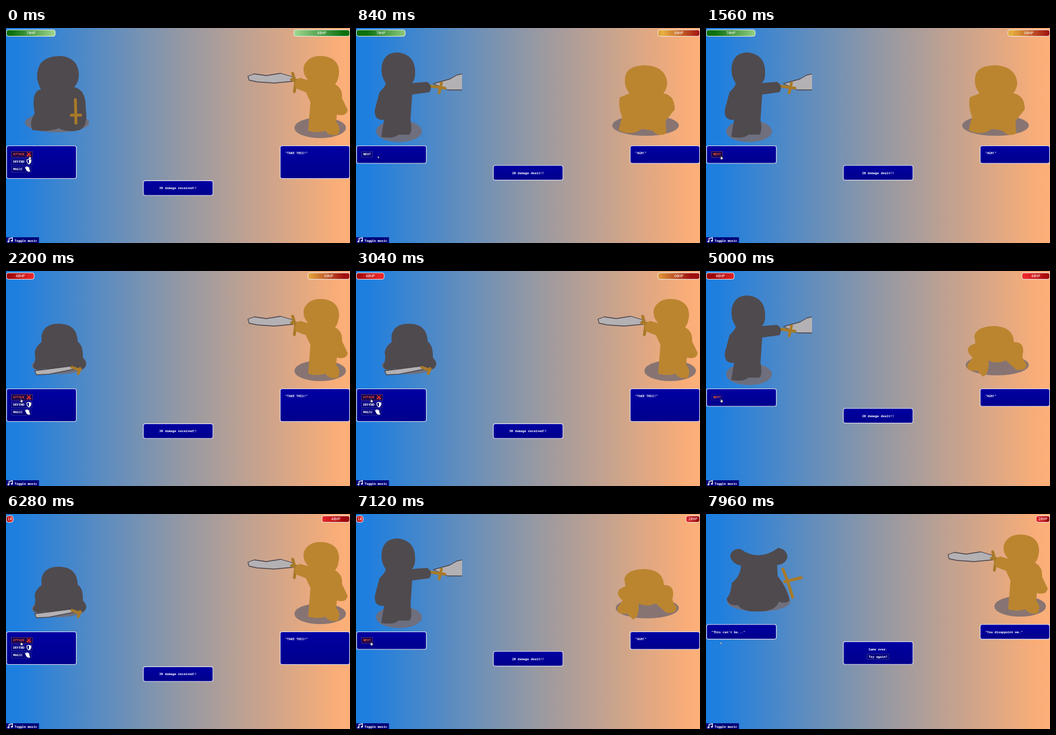
Recreate the animation shown at these times as an HTML page. Size 600x375 px, loop 8000 ms.

```html
<!DOCTYPE html>
<html lang="en">
<head>
<meta charset="utf-8">
<title>Duel</title>
<style>
  html, body { margin: 0; width: 100%; height: 100%; overflow: hidden; background: #888; }
  svg { display: block; width: 100vw; height: 100vh; }
  text { font: bold 5.45px "Noto Sans Mono", "DejaVu Sans Mono", monospace; fill: #fff; white-space: pre; }
  .hp text { font-size: 6.7px; font-weight: 500; text-anchor: middle; }
  .mid { text-anchor: middle; }
  .panel { fill: url(#navy); stroke: #e2e2f0; stroke-width: 1.15; }
  .btn rect { fill: #00007c; stroke: #4c4c92; stroke-width: .6; }
  .hot rect { fill: #14004c; stroke: #8c5058; }
  .hot text { fill: #ff5a30; }
  .down rect { fill: #00008e; stroke: #6a4a78; stroke-dasharray: 1 1; }
  .shadow { fill: #776c70; opacity: .85; }
  .left { fill: #4f4a4e; }
  .right { fill: #bb8530; }
  .blade { fill: #b4b1b4; stroke: #4a444a; stroke-width: 1.3; stroke-linejoin: round; }
  .hilt { fill: none; stroke: #a87a28; stroke-width: 5; stroke-linecap: round; stroke-linejoin: round; }
</style>
</head>
<body>
<svg viewBox="0 0 600 375" preserveAspectRatio="none">
  <defs>
    <linearGradient id="sky">
      <stop offset="0" stop-color="#1b7fe0"/>
      <stop offset=".04" stop-color="#207fde"/>
      <stop offset=".5" stop-color="#9298a5"/>
      <stop offset=".96" stop-color="#f9ad78"/>
      <stop offset="1" stop-color="#fdb079"/>
    </linearGradient>
    <linearGradient id="navy" x2="0" y2="1">
      <stop offset="0" stop-color="#0000a2"/>
      <stop offset="1" stop-color="#00008c"/>
    </linearGradient>
    <clipPath id="tip"><rect y="30" width="185" height="180"/></clipPath>
  </defs>
  <rect width="600" height="375" fill="url(#sky)"/>
  <g id="scene"></g>
  <g id="bars" class="hp"></g>
  <g id="music">
    <rect y="365" width="57.5" height="10" fill="#000078"/>
    <path d="M5.2 372.3V367l6-1.2v5.3" fill="none" stroke="#fff" stroke-width="1.3"/>
    <ellipse cx="4.2" cy="372.4" rx="1.7" ry="1.3" fill="#fff"/>
    <ellipse cx="10.2" cy="371.2" rx="1.7" ry="1.3" fill="#fff"/>
    <text x="15" y="372.6">Toggle music</text>
  </g>
  <g id="cursor">
    <path id="arrow" d="M0 .4v3.6l.9-.8.7 1.5.7-.4-.7-1.4h1.2z" fill="#fff" stroke="#223" stroke-width=".3"/>
    <path id="hand" d="M.8 0h1v2l2.4.6v2.2l-.8 1.5H1.1L-.4 4l.6-.6.6.5z" fill="#fff" stroke="#111" stroke-width=".5"/>
  </g>
</svg>
<script>
const LOOP = 8000;
const $ = id => document.getElementById(id);

// Start time, phase and both hit point totals.
const turns = [
  { at: 0, phase: "enemy", hp: [70, 80], pose: "kneel" },
  { at: 440, phase: "player", hp: [70, 60], pose: "kneel" },
  { at: 1720, phase: "enemy", hp: [40, 60], pose: "low" },
  { at: 3440, phase: "player", hp: [40, 40], pose: "low" },
  { at: 6000, phase: "enemy", hp: [10, 40], pose: "low" },
  { at: 6640, phase: "player", hp: [10, 20], pose: "low" },
  { at: 7300, phase: "over", hp: [0, 20], pose: "fallen" }
];

const shadow = (x, y, rx, ry) => `<ellipse class="shadow" cx="${x}" cy="${y}" rx="${rx}" ry="${ry}"/>`;
const body = (side, d) => `<path class="${side}" d="${d}"/>`;
const blade = d => `<path class="blade" d="${d}"/>`;
const hilt = d => `<path class="hilt" d="${d}"/>`;

const poses = {
  left: {
    kneel: shadow(89, 165, 56, 17) +
      body("left", "M60 62Q72 48 97 49Q124 52 127 78Q128 94 119 103Q140 108 139 140Q144 172 128 178Q108 183 92 175Q72 182 46 178Q40 164 50 149Q43 110 61 107Q48 84 60 62Z") +
      hilt("M121 125L122 166M114 152h16"),
    low: shadow(92, 165, 47, 15) +
      body("left", "M62 112Q67 91 94 92Q124 93 125 123Q135 130 134 151Q146 163 134 171L113 167Q92 174 69 170Q47 176 47 164Q53 158 50 141Q53 130 62 124Z") +
      blade("M50 174L112 166L120 171L75 180L53 181Z") +
      hilt("M115 168l14 5M126 179l3-9"),
    attack: shadow(75, 180, 40, 19) +
      `<g clip-path="url(#tip)">${blade("M135 97L164 89L176 82L190 79V108H160Z")}</g>` +
      hilt("M107 98l48 7M149 96l-4 17") +
      body("left", "M45 65Q50 41 76 43Q102 48 103 74Q104 91 97 96L124 94Q135 101 128 112L98 116L95 160Q99 180 93 186H74Q66 194 44 190L49 160Q31 162 33 142L41 112Q51 102 52 97Q42 82 45 65Z"),
    fallen: shadow(92, 153, 55, 17) +
      hilt("M134 96l8 20l9 29M137 118l29-7") +
      body("left", "M42 74Q44 60 60 61Q92 84 126 59Q142 62 142 76Q138 88 124 89L125 108Q143 132 146 151Q139 157 127 153Q122 170 91 170Q63 171 56 159Q38 161 36 147Q43 141 45 120Q60 109 61 90Q46 87 42 74Z")
  },
  right: {
    attack: shadow(548, 174, 45, 18) +
      blade("M422 84L433 80L454 83L479 79L500 85L500 93L468 96L438 94L424 91Z") +
      hilt("M500 79l5 17l-2 15M498 90l16 2") +
      body("right", "M520 65Q529 47 553 49Q580 52 581 76Q580 92 574 98Q588 106 586 122L596 143Q594 155 577 151L576 164Q585 174 579 186Q565 190 557 179Q543 184 527 179L531 129L523 112L505 105Q501 91 513 87L527 91Q516 79 520 65Z"),
    kneel: shadow(505, 170, 58, 18) +
      body("right", "M470 83Q474 65 506 65Q540 67 543 96Q542 107 536 114Q556 117 556 142L540 162L541 184Q528 191 517 179L499 176L488 182Q471 186 458 178L464 155Q457 138 460 121L477 114Q466 101 470 83Z"),
    low: shadow(508, 164, 55, 18) +
      body("right", "M468 113Q473 96 504 96Q536 98 537 124Q555 123 553 143Q549 151 559 162Q559 175 541 172L523 156Q507 163 493 156Q494 181 483 184L473 174Q453 176 456 163L465 151Q451 139 461 130L470 126Z")
  }
};

const label = (x, y, s, cls = "") => `<text x="${x}" y="${y + 2}" class="${cls}">${s}</text>`;
const panel = (x, y, w, h) => `<rect class="panel" x="${x}" y="${y}" width="${w}" height="${h}" rx="3.5"/>`;
const button = (x, y, w, s, cls = "", icon = "") =>
  `<g class="btn ${cls}"><rect x="${x}" y="${y - 4.8}" width="${w}" height="9.8"/>${label(x + 3, y, s)}${icon}</g>`;

const icons = {
  swords: '<path d="M36.8 217l6 6M42.8 217l-6 6M36 221.3l2.7 2.5M43.6 221.3l-2.7 2.5" stroke="#f2382c" stroke-width="1.6"/>',
  shield: '<path d="M40 229l3.6 1.2q.2 5-3.6 7q-3.8-2-3.6-7z" fill="#00007c" stroke="#fff" stroke-width="1.2"/><path d="M40 229l3.6 1.2q.2 5-3.6 7z" fill="#fff"/>',
  palm: '<path d="M33 243l1.2-.7 1 1 .6-2 1.2.1.6 1.1 1-.6.8 1 1 .2.7 4.2 1.2 2.8-3.1.7-3.2-1.8z" fill="#fff"/>'
};

function panels(phase, hover, pressed) {
  if (phase === "over") {
    return panel(1, 192.7, 121.7, 25.6) + panel(478.2, 192.7, 121.2, 25.6) + panel(239.5, 222.6, 121.5, 39.6) +
      label(9.5, 206, '"This can\'t be..."') + label(487, 206, '"You disappoint me."') +
      label(300, 235.7, "Game over.", "mid") +
      '<g class="btn"><rect x="281" y="244" width="38" height="9.6"/></g>' + label(300, 248.8, "Try again?", "mid");
  }
  const enemy = phase === "enemy";
  const h = enemy ? 57 : 30.5;
  const hot = hover ? "hot" : "";
  const buttons = enemy
    ? button(9.6, 220.2, 36.5, "ATTACK", hot, icons.swords) +
      button(9.6, 233.2, 36, "DEFEND", "", icons.shield) +
      button(9.6, 246.2, 34, "MAGIC", "", icons.palm)
    : button(9.8, 220.2, 19, "NEXT", hot + (pressed ? " down" : ""));
  const y = enemy ? 266.4 : 239.7;
  return panel(1, 205.5, 121.7, h) + panel(478.2, 205.5, 121.2, h) + panel(239.5, y, 121.5, 25.6) + buttons +
    label(487, 218.3, enemy ? '"TAKE THIS!"' : '"AGH!"') +
    label(300, y + 12.9, enemy ? "30 damage received!!" : "20 damage dealt!!", "mid");
}

function figures({ phase, pose }) {
  const { left, right } = poses;
  if (phase === "player") return left.attack + right[pose];
  const enemy = phase === "over" ? `<g transform="translate(0 -13)">${right.attack}</g>` : right.attack;
  return left[pose] + enemy;
}

const tones = hp => hp > 60 ? ["#0b700e", "#a0d890"] : hp > 40 ? ["#a01010", "#e8b040"] : ["#9c0608", "#ee282a"];

function bar(hp, side, t) {
  if (!hp) return "";
  const w = hp * 1.225 - .6, x = side ? 599.5 - w : .7;
  const [dark, light] = tones(hp);
  const shift = w * .12 * Math.sin(t / LOOP * Math.PI * 4);
  const from = side ? x + w : x, to = side ? x : x + w;
  const id = "bar" + side;
  return `<linearGradient id="${id}" gradientUnits="userSpaceOnUse" spreadMethod="reflect" x1="${from + shift}" x2="${to + shift}" y1="0" y2="0">
    <stop offset=".1" stop-color="${dark}"/><stop offset="1" stop-color="${light}"/></linearGradient>
    <rect x="${x}" y="3.2" width="${w}" height="11.2" rx="3.6" fill="url(#${id})" stroke="#f0f0f0" stroke-width="1"/>
    <text x="${x + w / 2}" y="11.3">${hp > 10 ? hp + "HP" : hp}</text>`;
}

const ease = p => (p = Math.min(1, Math.max(0, p)), p * p * (3 - 2 * p));

let shown = "";
function draw(t) {
  const turn = turns.findLast(s => s.at <= t);
  const x = 39.5 - 1.5 * ease(t / 700) - 13 * ease((t - 1000) / 500);
  const hover = turn.phase === "enemy" || (turn.phase === "player" && x < 29);
  const pressed = turn.phase === "player" && t >= 4900 && t < 6000;
  const key = [turn.at, hover, pressed].join();
  if (key !== shown) {
    $("scene").innerHTML = figures(turn) + panels(turn.phase, hover, pressed);
    shown = key;
  }
  $("bars").innerHTML = bar(turn.hp[0], 0, t) + bar(turn.hp[1], 1, t);
  $("cursor").setAttribute("transform", `translate(${x} 223)`);
  $("hand").style.display = hover ? "" : "none";
  $("arrow").style.display = hover ? "none" : "";
}

const start = performance.now();
function tick() {
  draw((performance.now() - start) % LOOP);
  requestAnimationFrame(tick);
}
tick();
</script>
</body>
</html>
```
